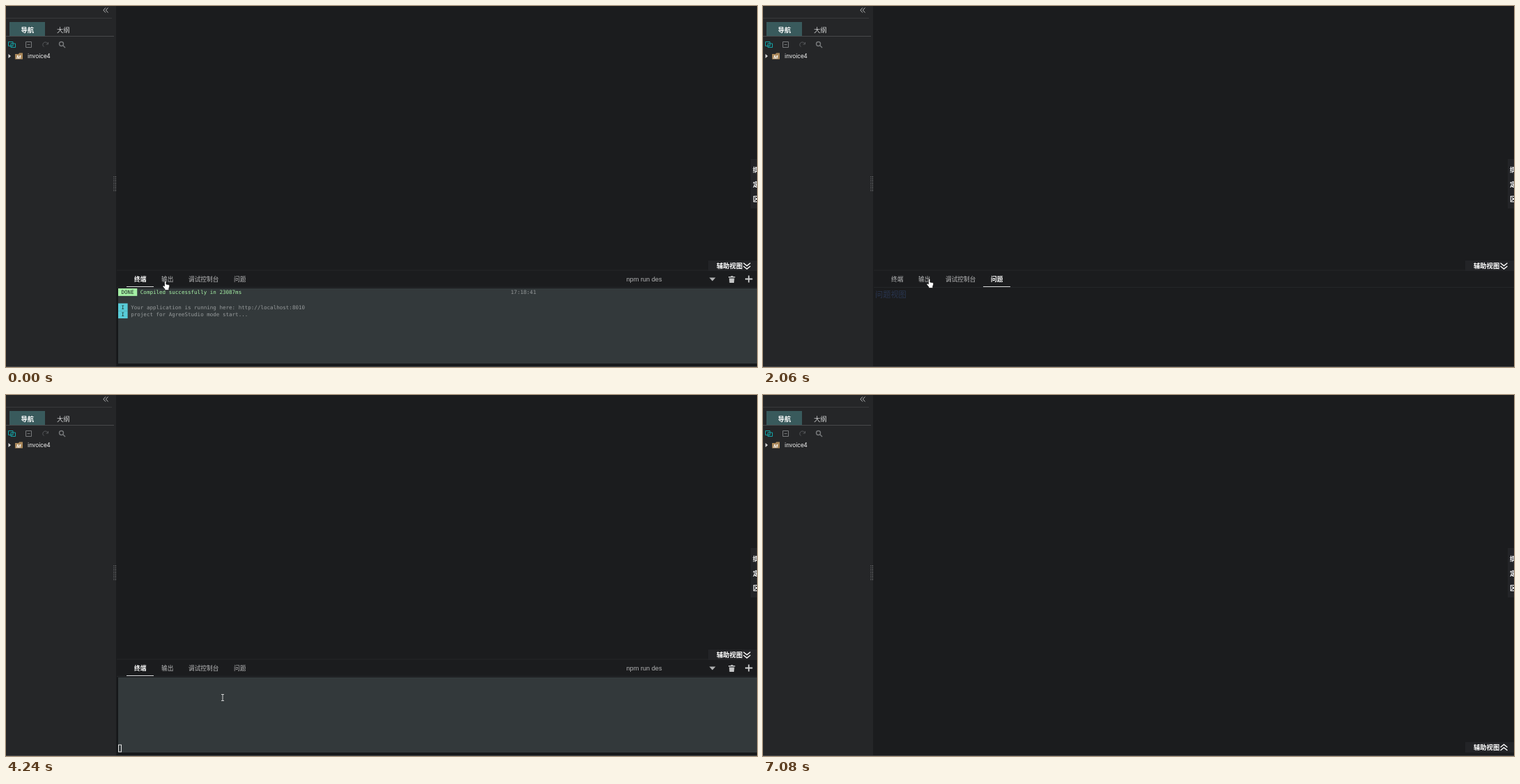
An HTML page for the animation above (8350 ms loop, 1078 by 519 pixels).

```html
<!DOCTYPE html>
<html lang="zh-CN">
<head>
<meta charset="utf-8">
<title>IDE panel</title>
<style>
html, body { margin: 0; width: 100%; height: 100%; overflow: hidden; background: #1b1c1e; }
svg { display: block; }
text { white-space: pre; font: 9.3px "Noto Sans CJK SC", "Noto Sans CJK", sans-serif; fill: #fff; }
.bold { font-weight: bold; }
.ui { font-family: "Liberation Sans", Arial, sans-serif; }
#tabs text { font-size: 8.67px; fill: #b8b9ba; }
#tabs .on { font-weight: bold; fill: #fff; }
#log text { font: 7.55px "DejaVu Sans Mono", monospace; fill: #969a9b; }
#log .ok { fill: #a5f0a5; }
#log .badge { fill: #1b2a22; }
#output text { font: 10.4px "DejaVu Sans Mono", monospace; fill: #fb5450; stroke: #fb5450; stroke-width: .15; }
#output text:first-child { fill: #fff; stroke: #fff; }
.hint { font-size: 11.2px; fill: #2a3650; }
.icon { fill: none; stroke: #77797b; }
</style>
</head>
<body>
<svg width="1078" height="519">
  <!-- sidebar -->
  <rect width="158" height="519" fill="#252628"/>
  <path d="M143 2.5l-3.2 3.5l3.2 3.5m3.5-7l-3.2 3.5l3.2 3.5" class="icon" style="stroke:#b5b6b7"/>
  <path d="M0 17.5H152" stroke="#38393b"/>
  <rect x="5" y="23" width="51" height="20" fill="#395a5c"/>
  <path d="M0 43.5H155" stroke="#48494b"/>
  <text x="21.5" y="37.5" class="bold">导航</text>
  <text x="73" y="37.5" style="fill:#d0d1d2">大纲</text>
  <path d="M3.5 51.5h6.5v6h-6.5zm3.500 2.500h6.5v5.5h-6.5z" class="icon" style="stroke:#14a3a6"/>
  <path d="M28.500 51.500h8v8h-8zm2 4h4" class="icon"/>
  <path d="M54.500 58.800A3.700 3.700 0 1 1 60 54.500m.5-2.500v3h-3" class="icon" style="stroke:#55575a"/>
  <circle cx="79.5" cy="54.500" r="3" class="icon" stroke-width="1.4"/>
  <path d="M82 57l3 3" class="icon" stroke-width="1.400"/>
  <path d="M3.500 69l3.500 3l-3.500 3z" fill="#d8d8d8"/>
  <path d="M13 69h5l1-1.500h5v9h-11z" fill="#a9875a"/>
  <text x="15" y="75.500" class="ui bold" style="font-size:7.500px;font-style:italic">M</text>
  <text x="31" y="74.500" style="font:8.800px Roboto,sans-serif;fill:#e8e8e8">invoice4</text>
  <path d="M155 245v22m2.500-22v22" stroke="#8a8b8d" stroke-dasharray="1 1.500"/>

  <!-- right-hand strip -->
  <rect x="1069" y="220" width="9" height="71" fill="#232427"/>
  <g id="strip"></g>

  <g id="panel">
    <path d="M159 380H1078M159 404.500H1078" stroke="#242629"/>
    <g id="tabs"></g>
    <path id="underline" stroke="#d5d6d7"/>

    <g class="view">
      <text x="890.500" y="396" class="ui" style="font-size:9.200px;fill:#b4b5b6">npm run des</text>
      <path d="M1009.500 390.500h9l-4.500 5z" fill="#b0b1b2"/>
      <path d="M1037 389h3l1-1h2l1 1h2.500v1.500h-9.500zm1 2.500h7.500l-.5 6.500h-6.500z" fill="#c4c5c6"/>
      <path d="M1061 392.500h10.500m-5.250-5v10" stroke="#d0d1d2" stroke-width="1.800"/>
      <rect x="159" y="406" width="919" height="112" fill="#16181a"/>
      <svg x="161" y="406" width="917" height="108">
        <rect width="917" height="108" fill="#33393b"/>
        <g id="log"></g>
        <rect id="prompt" x=".5" width="4" height="10" fill="none" stroke="#e8e8e8"/>
      </svg>
    </g>
    <g class="view" id="output"></g>
    <g class="view"><text x="161" y="419" class="hint">调试控制台视图</text></g>
    <g class="view"><text x="161" y="419" class="hint">问题视图</text></g>
  </g>

  <g id="toggle">
    <rect x="1008" y="366" width="70" height="15" fill="#232427"/>
    <text x="1020" y="377.300" class="bold">辅助视图</text>
    <path id="chevron" d="M1058.500 369.500l5 4l5-4m-10 4.500l5 4l5-4" fill="none" stroke="#fff" stroke-width="1.400"/>
  </g>
  <path d="M0 518.500H1078" stroke="#444648"/>

  <g id="cursor">
    <path id="hand" d="M-1.500 1.500q0-1.500 1.200-1.500t1.200 1.500v3.500l3.800.8q1.300.4 1.100 2.200l-1 3v2.500h-5.800v-1.500l-3-3.700q0-1.800 1.400-1.300l1.100 1z" fill="#fff" stroke="#111" stroke-width=".7"/>
    <path id="beam" d="M-2-4.500h4m-4 9h4m-2-9v9" stroke="#d0d2d2"/>
    <path id="arrow" d="M0 0v11.500l2.700-2.500l1.800 4l1.700-.8l-1.700-3.900h3.500z" fill="#fff" stroke="#111" stroke-width=".7"/>
  </g>
</svg>
<script>
const LOOP = 8350, ROW = 10.75, CELL = 4.545;
const $ = id => document.getElementById(id);
const show = (el, on) => el.style.display = on ? '' : 'none';
const text = (x, y, str, cls = '') => `<text x="${x}" y="${y}" class="${cls}">${str}</text>`;

// Tabs sit side by side, each as wide as its label plus padding
const tabs = [];
let edge = 173;
for (const label of ['终端', '输出', '调试控制台', '问题']) {
  const width = label.length * 8.67 + 21.67;
  tabs.push({ label, x: edge, width });
  edge += width;
}
$('tabs').innerHTML = tabs.map(tab => text(tab.x + 11, 395.5, tab.label)).join('');
$('strip').innerHTML = [...'绑定区'].map((c, i) => text(1072, 238.5 + i * 21, c, 'bold')).join('');

const script = 'http://localhost:8082/static/js/vendor.874b148adf1b4f1834ac.js';
$('output').innerHTML = text(171.3, 423, '[ 5:17:59 PM ] [ network error ]') + [
  '[] []',
  'Error: timeout of 2000ms exceeded',
  `    at JpeU.e.exports (${script}:28:22951)`,
  `    at XMLHttpRequest.p.ontimeout (${script}:79:408812)`
].map((line, i) => text(178.3, 439 + i * 17.3, line)).join('');

// Terminal log: the same report after every build, six rows each
const cell = (col, row, str, cls) => text(col * CELL, row * ROW + 8, str, cls);
const badge = (row, str, cells, color) =>
  `<rect y="${row * ROW}" width="${cells * CELL}" height="${ROW + .1}" fill="${color}"/>` +
  cell(1, row, str, 'badge');
const build = age => {
  const row = -6 * age;
  return badge(row, 'DONE', 6, '#a5f0a5') +
    cell(7, row, `Compiled successfully in ${23087 - age * 731}ms`, 'ok') +
    cell(124, row, `17:${18 - age}:41`) +
    badge(row + 2, 'I', 3, '#58ccd8') +
    cell(4, row + 2, 'Your application is running here: http://localhost:8010') +
    badge(row + 3, 'I', 3, '#58ccd8') +
    cell(4, row + 3, 'project for AgreeStudio mode start...');
};
$('log').innerHTML = [0, 1, 2].map(build).join('');

// Pointer moves: start, end, destination, shape; it rests in between
const moves = [
  [0, 0, 229, 395, 'hand'],
  [300, 670, 275, 393, 'hand'],
  [880, 980, 336, 388, 'hand'],
  [1400, 1670, 258, 392, 'hand'],
  [1670, 2060, 239, 392, 'hand'],
  [2060, 2720, 196, 392, 'hand'],
  [2720, 3080, 311, 435, 'beam'],
  [4260, 4780, 378, 435, 'beam'],
  [4900, 5180, 531, 440, 'beam'],
  [5180, 5680, 970, 387, 'arrow'],
  [5680, 6240, 1042, 370, 'hand'],
  [6540, 6930, 1044, 511, 'arrow']
];
function pointer(t) {
  const i = moves.findLastIndex(m => m[0] <= t);
  const [start, end, x, y, shape] = moves[i];
  const [, , fromX, fromY] = moves[Math.max(0, i - 1)];
  const p = Math.min(1, (t - start) / (end - start || 1));
  return { x: fromX + (x - fromX) * p, y: fromY + (y - fromY) * p, shape };
}

const clicks = [280, 980, 1400, 2600];
const scrolled = t => t < 3240 ? 0 : t < 3820 ? 6 : t < 3960 ? 12 : 3;
const views = [...document.querySelectorAll('.view')];

function draw(now) {
  const t = now % LOOP, open = t < 6540;
  const active = clicks.filter(c => c <= t).length % tabs.length;
  show($('panel'), open);
  [...$('tabs').children].forEach((el, i) => el.classList.toggle('on', i === active));
  views.forEach((el, i) => show(el, i === active));
  $('underline').setAttribute('d', `M${tabs[active].x} 403.5h${tabs[active].width}`);

  show($('log'), t < 4240);
  $('log').setAttribute('transform', `translate(0 ${scrolled(t) * ROW})`);
  show($('prompt'), t >= 4240);
  $('prompt').setAttribute('y', t < 4660 ? 97 : .5);

  $('toggle').setAttribute('transform', `translate(0 ${open ? 0 : 133})`);
  $('chevron').setAttribute('transform', open ? '' : 'translate(0 747.5) scale(1 -1)');

  const { x, y, shape } = pointer(t);
  show($('cursor'), t < 7080);
  $('cursor').setAttribute('transform', `translate(${x} ${y})`);
  for (const id of ['hand', 'beam', 'arrow']) show($(id), id === shape);
  requestAnimationFrame(draw);
}
draw(performance.now());
</script>
</body>
</html>
```
